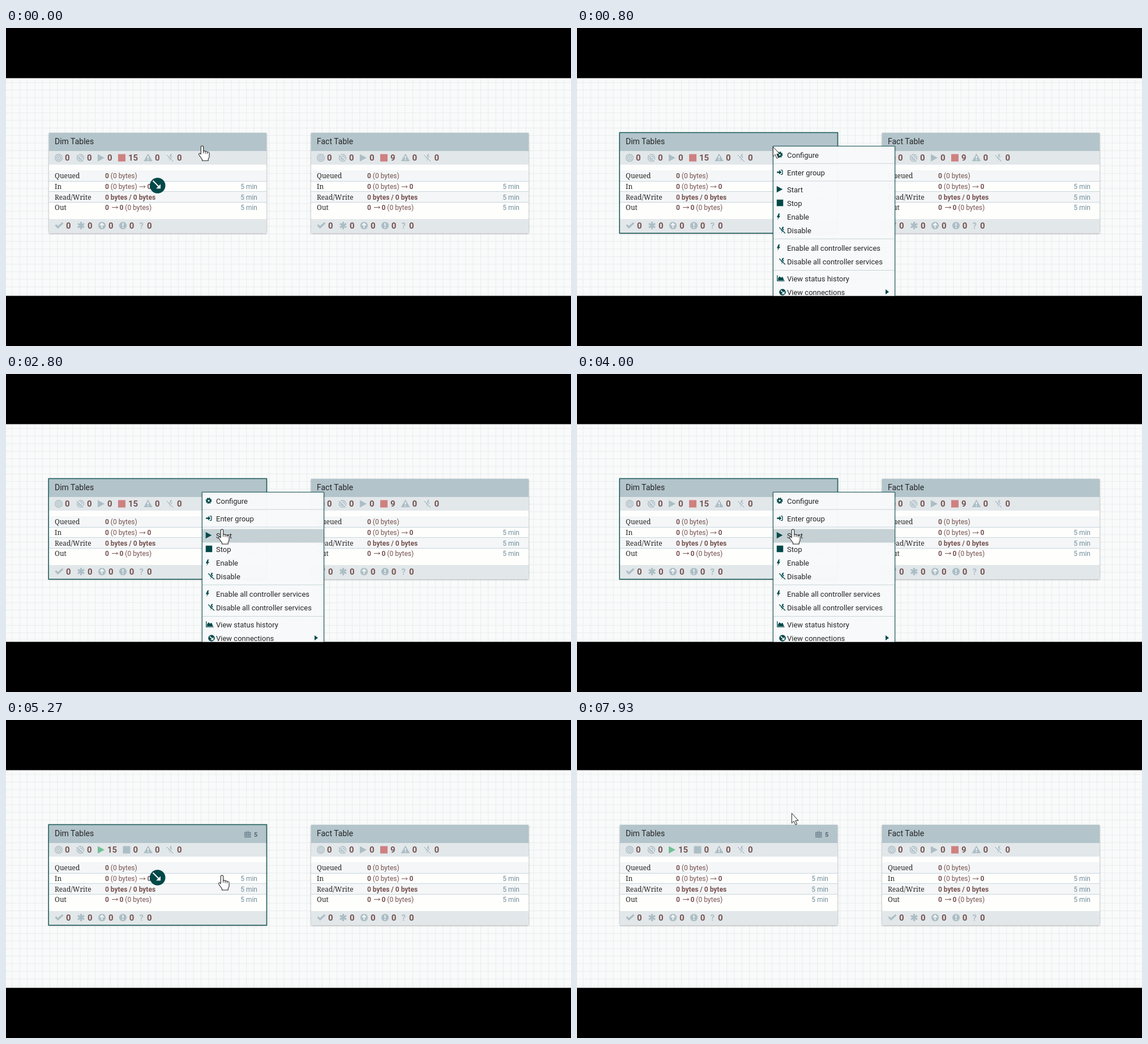
An HTML page for the animation above (8 s loop, 998 by 561 pixels).

```html
<!DOCTYPE html>
<html lang="en">
<head>
<meta charset="utf-8">
<title>Process groups</title>
<style>
  html, body { margin: 0; width: 100%; height: 100%; overflow: hidden; background: #000; }
  svg { display: block; width: 100%; height: 100%; }
  text { font: 12px Roboto, sans-serif; fill: #775351; white-space: pre; }
  .name { font-size: 14px; fill: #262626; }
  .label { font: 12px "Noto Serif", serif; fill: #262626; }
  .strong { font-weight: 700; }
  .count { font-size: 15px; font-weight: 700; }
  .window { fill: #728e9b; text-anchor: end; }
  .threads { font-size: 11px; font-weight: 700; fill: #56666e; }
  .item { font-size: 13px; fill: #262626; }
  .mark { font: 700 15px Roboto, sans-serif; fill: #acbec5; }
  .muted { fill: #acbec5; stroke: #acbec5; }
  .red { fill: #cf8080; stroke: #cf8080; }
  .green { fill: #72c095; stroke: #72c095; }
  .teal { fill: #004849; stroke: #004849; }
  .icon { stroke-width: 0; }
  .line { fill: none; stroke-width: 1.5; }
  .cut { fill: none; stroke: #f9fafb; stroke-width: 1.8; }
</style>
</head>
<body>
<svg id="stage" viewBox="0 0 998 561" preserveAspectRatio="none"></svg>
<script>
const rect = (x, y, w, h, fill, more = '') =>
  `<rect x="${x}" y="${y}" width="${w}" height="${h}" fill="${fill}" ${more}/>`;
const text = (x, y, cls, value) => `<text x="${x}" y="${y}" class="${cls}">${value}</text>`;
const path = (d, cls = '') => `<path d="${d}" class="${cls}"/>`;
const layer = (id, body) => `<g id="${id}">${body}</g>`;

const bolt = path('M0-6.5L-3.5 1H-.5L-2.5 6.5L3.5-2H.7L2.7-6.5Z');
const slash = path('M-6.5-6.5L6.5 6.5', 'cut') + path('M-6.5-5.5L5.5 6.5', 'line');
const disc = '<circle r="6.6"/>';
const icons = {
  target: '<circle r="6.2" class="line"/><circle r="3.4" class="line"/><circle r="1.3"/>',
  off: '<circle r="6" class="line"/><circle r="3" class="line"/>' + slash,
  play: path('M-6-6.5L6 0L-6 6.5Z'),
  stop: path('M-6.5-6.5H6.5V6.5H-6.5Z'),
  warn: path('M0-7L7.8 6.5H-7.8Z') + path('M0-2.5V1.6M0 3V4.8', 'cut'),
  bolt,
  noBolt: bolt + slash,
  check: path('M-7.5 0L-5.3-2.3L-2.3.7L5.3-6L7.5-3.7L-2.3 5.5Z'),
  star: '<g stroke-width="3.2">' + path('M0-6.5V6.5M-5.6-3.3L5.6 3.3M-5.6 3.3L5.6-3.3') + '</g>',
  up: disc + path('M0 4.2V-3.5M-3.4-.3L0-3.7L3.4-.3', 'cut'),
  alert: disc + path('M0-4.2V1M0 2.4V4.4', 'cut'),
  gear: '<circle r="3.4" fill="none" stroke-width="3"/><circle r="5.3" fill="none" stroke-width="1.8" stroke-dasharray="2.2 1.96"/>',
  enter: path('M-6-1.5H-1.5V-4.5L3 0L-1.5 4.5V1.5H-6Z') + path('M1.5-4.5H3.5Q5-4.5 5-3V3Q5 4.5 3.5 4.5H1.5', 'line'),
  chart: path('M-7-6V5.3H7.5', 'line') + path('M-5.5 4V0L-2.5-4L.5-1L3.5-3L6.5 4Z'),
  link: disc + path('M-3.5-3.5L3 3M3.2-1.5V3.2H-1.5', 'cut'),
};
const icon = (name, x, y, cls = 'muted', scale = 1) =>
  `<g class="icon ${cls}" transform="translate(${x} ${y}) scale(${scale})">${icons[name]}</g>`;
const arrow = (x, y) =>
  `<path d="M${x} ${y}h10.5m-2.6-2.2l2.6 2.2l-2.6 2.2" fill="none" stroke="#775351"/>`;

// Status icons flow to the right with the width of the counts before them.
function statusBar(running, stopped) {
  const width = n => String(n).length * 8.5;
  const count = (x, n) => text(x, 49, 'count', n);
  const stopX = 103 + width(running) + 10.5;
  const warnX = stopX + 18 + width(stopped) + 10;
  return icon('target', 17, 44) + count(28, 0) + icon('off', 55.5, 44) + count(67, 0)
    + icon('play', 92, 44, running ? 'green' : 'muted') + count(103, running)
    + icon('stop', stopX + 6.5, 44, stopped ? 'red' : 'muted') + count(stopX + 18, stopped)
    + icon('warn', warnX + 8, 43.5) + count(warnX + 19.9, 0)
    + icon('noBolt', warnX + 47.5, 44) + count(warnX + 58.9, 0);
}

function group(x, name, status) {
  const rows = ['Queued', 'In', 'Read/Write', 'Out'];
  const baselines = [80, 99, 117.5, 135.5];
  const footer = [['check', 18, 30], ['star', 56.5, 68], ['up', 93.5, 105], ['alert', 130.5, 141.8]];
  return `<g transform="translate(${x} 185)">`
    + rect(0, 0, 384, 176.4, '#fefefd', 'filter="url(#shadow)"')
    + rect(0, 0, 384, 32, '#b3c4cb') + rect(0, 32, 384, 24, '#e2e7ea')
    + rect(0, 66, 384, 19, '#f4f6f7') + rect(0, 104, 384, 18, '#f4f6f7')
    + [85, 103, 122].map(y => rect(0, y, 384, 1, '#c7d6dc')).join('')
    + rect(0, 152, 384, 24.4, '#e2e7ea')
    + text(10, 20, 'name', name) + status
    + rows.map((row, i) => text(10, baselines[i], 'label', row)
        + (i ? text(368, baselines[i], 'window', '5 min') : '')).join('')
    + [80, 99].map(y => text(99, y, '', '<tspan class="strong">0</tspan> (0 bytes)')).join('')
    + arrow(159.5, 95) + text(173.5, 99, 'strong', '0')
    + text(99, 117.5, 'strong', '0 bytes / 0 bytes')
    + text(99, 135.5, 'strong', '0') + arrow(111, 131.5)
    + text(124.5, 135.5, '', '<tspan class="strong">0</tspan> (0 bytes)')
    + footer.map(([kind, at, label]) => icon(kind, at, 163.5) + text(label, 169, 'count', '0')).join('')
    + text(159.5, 169, 'mark', '?') + text(173, 169, 'count', '0') + '</g>';
}

const threads = `<g stroke="#6f8691" stroke-width="1.3" fill="none">
  <path d="M346 12.5v9M349 11v11M352 10.5v12M355 12.5v9M345 14h12M345 17.5h12M345 21.5h12"/></g>`
  + text(362, 20.5, 'threads', '5');

const items = [
  ['Configure', 224, 'gear', 358], ['Enter group', 255, 'enter', 358.5],
  ['Start', 285, 'play', 358], ['Stop', 309, 'stop', 358.5],
  ['Enable', 333.5, 'bolt', 356], ['Disable', 357, 'noBolt', 363],
  ['Enable all controller services', 388, 'bolt', 356],
  ['Disable all controller services', 412, 'noBolt', 363],
  ['View status history', 442, 'chart', 360], ['View connections', 466.5, 'link', 363],
];
const menu = rect(346.5, 208.5, 215, 300, '#f9fafc', 'fill-opacity=".97" stroke="#1c5a5b" filter="url(#shadow)"')
  + rect(347, 273.5, 214, 24, '#c5d1d5', 'id="hover"')
  + [238.5, 269.5, 371.5, 427].map(y => rect(347, y, 214, 1, '#c7d6dc')).join('')
  + items.map(([label, y, kind, x]) => icon(kind, x, y - .5, 'teal', .88) + text(371, y + 4.5, 'item', label)).join('')
  + path('M545 461L551 465.5L545 470Z', 'icon teal');

const hand = `<g transform="translate(.5 -.8)" stroke="#222"><path d="M-2.2 2Q-2.2-.2 0-.2T2.2 2V9Q4.3 7.8 5.4 9.6Q7.6 8.6 8.8 10.8Q12.6 9.8 12.6 13.5V18Q12.6 21 10.8 23V25.8H0V23.5L-5 16.5Q-6.8 13.5-4.8 12.8Q-3.6 12.6-2.2 14.5Z"
  fill="#fff" stroke-width="1.1" stroke-linejoin="round"/><path d="M2.2 9V13M5.6 10V13.5M9 11V14"/></g>`;
const pointer = `<path d="M.3 .5V18L4.2 14.3L7 21L9.6 19.8L6.9 13.3H12Z" fill="#fff" stroke="#222"/>`;

const GRID = 13.35;
const stage = document.getElementById('stage');
stage.innerHTML = `<defs>
  <pattern id="grid" x="10.3" y="95.7" width="${GRID}" height="${GRID}" patternUnits="userSpaceOnUse">
    ${rect(0, 0, GRID, GRID, '#f9fafa')}${rect(0, 0, 1, GRID, '#e9edef')}${rect(0, 0, GRID, 1, '#e9edef')}
  </pattern>
  <filter id="shadow" x="-5%" y="-5%" width="110%" height="115%">
    <feDropShadow dx="0" dy="1" stdDeviation="1.6" flood-color="#000" flood-opacity=".4"/>
  </filter>
  <clipPath id="view">${rect(0, 88.5, 998, 384, '#000')}</clipPath></defs>`
  + rect(0, 0, 998, 561, '#000')
  + '<g clip-path="url(#view)">' + rect(0, 88, 998, 385, 'url(#grid)')
  + group(76, 'Dim Tables', layer('idle', statusBar(0, 15)) + layer('running', statusBar(15, 0) + threads))
  + group(539, 'Fact Table', statusBar(0, 9))
  + rect(75.2, 184.5, 385.3, 177.6, 'none', 'id="selection" stroke="#1f605d" stroke-width="1.6"')
  + layer('connector', `<circle cx="267.7" cy="278" r="13.8" fill="#004849"/>
      <path d="M259.5 269.5L271.5 281.5" stroke="#fff" stroke-width="2"/><path d="M273 275.5V283.3H265.2Z" fill="#fff"/>`)
  + layer('menu', menu) + layer('cursor', layer('hand', hand) + layer('pointer', pointer)) + '</g>';

const parts = Object.fromEntries([...stage.querySelectorAll('g[id], rect[id]')].map(el => [el.id, el]));
const show = (name, on) => parts[name].setAttribute('visibility', on ? 'inherit' : 'hidden');
const ease = (t, from, to) => {
  const p = Math.min(1, Math.max(0, (t - from) / (to - from)));
  return p * p * (3 - 2 * p);
};

const LOOP = 8000, MENU_OPEN = 400, MENU_CLOSE = 5050, STARTED = 5200, DESELECT = 7300;

function draw(t) {
  const toStart = ease(t, 930, 1500), away = ease(t, 6250, 6800);
  const x = 346 + 35 * toStart - 2 * away;
  const y = 209 + 66 * toStart - 111 * away;
  const menuOpen = t >= MENU_OPEN && t < MENU_CLOSE;
  const hovered = menuOpen && items.find(item => Math.abs(item[1] - y) <= 12.5);
  const overGroup = !menuOpen && y > 185;
  const useHand = overGroup || Boolean(hovered);

  parts.cursor.setAttribute('transform', `translate(${x} ${y})`);
  show('hand', useHand);
  show('pointer', !useHand);
  show('menu', menuOpen);
  show('hover', hovered);
  if (hovered) parts.hover.setAttribute('y', hovered[1] - 11.5);
  show('connector', overGroup);
  show('selection', t >= MENU_OPEN && t < DESELECT);
  show('idle', t < STARTED);
  show('running', t >= STARTED);
}

const begin = performance.now();
function tick() {
  draw((performance.now() - begin) % LOOP);
  requestAnimationFrame(tick);
}
tick();
</script>
</body>
</html>
```
